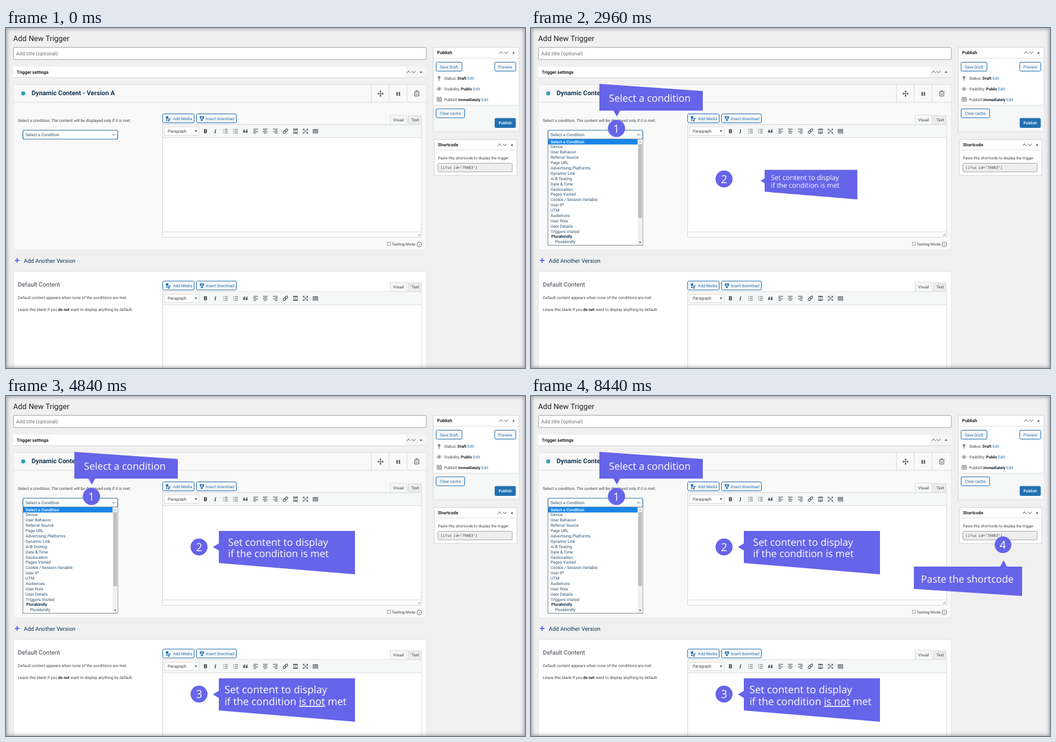
Write an HTML page that moves like this. It is 873 px wide and 572 px high and loops after 8760 ms.

```html
<!DOCTYPE html>
<html lang="en">
<head>
<meta charset="utf-8">
<title>Add New Trigger</title>
<style>
html, body { margin: 0; width: 100%; height: 100%; overflow: hidden; background: #f0f0f1; }
body::after { content: ""; position: fixed; inset: 0; box-shadow: inset 0 0 6px 1px rgba(60,60,65,.5); }
svg { display: block; width: 873px; height: 572px; }
text { font: 6.72px Roboto, sans-serif; fill: #3c434a; text-rendering: geometricPrecision; white-space: pre; }
.bold, .head { font-weight: 700; fill: #1d2327; }
.head { font-size: 7.5px; }
.link { fill: #2271b1; }
.mid { text-anchor: middle; }
.list { font-size: 6.95px; fill: #2c4f6e; }
.white { fill: #fff; }
.panel { fill: #fff; stroke: #d5d6d9; }
.btn { fill: #f6f7f7; stroke: #2271b1; }
.line { fill: none; stroke: #50575e; }
.rule { fill: none; stroke: #dcdcde; }
.ink { fill: #50575e; }
.navy { fill: #14364f; }

.tip { fill: #6664e8; }
.dot, .bubble { transform-box: fill-box; transform-origin: center; animation: 8760ms cubic-bezier(.215,.61,.355,1) infinite both; }
.bubble text { font: 16.75px "Open Sans", sans-serif; fill: #fff; }
.dot text { font: 18.5px "Open Sans", sans-serif; fill: #fff; text-anchor: middle; }

#menu { animation: menu 8760ms linear infinite both; }
@keyframes menu { 0%, 2.74% { opacity: 0 } 7.31%, 100% { opacity: 1 } }
#d1 { animation-name: d1 } #b1 { animation-name: b1 }
#d2 { animation-name: d2 } #b2 { animation-name: b2 }
#d3 { animation-name: d3 } #b3 { animation-name: b3 }
#d4 { animation-name: d4 } #b4 { animation-name: b4 }
@keyframes d1 { 0%, 12.33% { transform: scale(0) } 15.07%, 100% { transform: none } }
@keyframes b1 { 0%, 14.16% { transform: scale(0) } 18.72%, 100% { transform: none } }
@keyframes d2 { 0%, 30.59% { transform: scale(0) } 33.33%, 100% { transform: none } }
@keyframes b2 { 0%, 32.42% { transform: scale(0) } 36.99%, 100% { transform: none } }
@keyframes d3 { 0%, 47.03% { transform: scale(0) } 49.77%, 100% { transform: none } }
@keyframes b3 { 0%, 48.86% { transform: scale(0) } 53.42%, 100% { transform: none } }
@keyframes d4 { 0%, 63.93% { transform: scale(0) } 66.67%, 100% { transform: none } }
@keyframes b4 { 0%, 65.75% { transform: scale(0) } 70.32%, 100% { transform: none } }
</style>
</head>
<body>
<svg viewBox="0 0 873 572">
  <defs>
    <g id="arrows">
      <path class="line" d="M0 2.2 3.2-1.2 6.4 2.2M8.6-1.2 11.8 2.2 15-1.2"/>
      <path class="ink" d="M22.2 2 24.2-1.2 26.2 2Z"/>
    </g>
    <g id="rows"><path class="line" d="M0-3H7.5M0 0H7.5M0 3H7.5"/></g>

    <g id="editor">
      <rect class="btn" x="263.5" y="144.5" width="53" height="15" rx="2"/>
      <rect class="btn" x="320.5" y="144.5" width="67" height="15" rx="2"/>
      <g fill="#2271b1">
        <path d="M269 148.500h4v4h-4zM273.500 152h3.500v1.200h-2v3h-1.500z"/>
        <circle cx="270.500" cy="154.700" r="1.300"/><circle cx="273.800" cy="156" r="1.300"/>
        <path d="M326 148.500h7v4h-2v-2.500h-3v2.500h-2zM328.700 151h1.600v3h1.700l-2.500 3-2.500-3h1.700z"/>
      </g>
      <text class="link" x="281" y="154.500">Add Media</text>
      <text class="link" x="336" y="154.500">Insert download</text>

      <rect x="676.500" y="147.500" width="22" height="15" fill="#ebebec" stroke="#dcdcde"/>
      <rect x="646.500" y="146.500" width="27.500" height="16" fill="#f6f7f7" stroke="#dcdcde"/>
      <text x="651" y="157" font-size="6.9">Visual</text>
      <text x="682" y="157" font-size="6.900">Text</text>

      <rect x="263.500" y="162.500" width="435.500" height="189.500" fill="#fff" stroke="#d5d6d9"/>
      <rect x="264" y="163" width="434.500" height="21.500" fill="#f6f7f7"/>
      <path class="rule" d="M264 184.500H699M264 343H699"/>
      <path d="M693 350l4-4M695.500 350l1.500-1.500" class="line" stroke-width=".7"/>

      <rect x="266.500" y="166.500" width="58.500" height="14" fill="#fff" stroke="#dcdcde"/>
      <text x="272" y="176" style="font-size:6.9px">Paragraph</text>
      <path class="ink" d="M317.300 172.200h4.600l-2.300 3z"/>

      <text class="mid" x="335.500" y="177" style="font-size:9.500px;font-weight:900">B</text>
      <text class="mid" x="352" y="177" style="font:italic 700 9.500px 'Liberation Serif',serif">I</text>
      <path class="line" d="M368 170.500h5M368 173.500h5M368 176.500h5" stroke-width=".9"/>
      <path class="line" d="M365.500 170.500h1.400M365.500 173.500h1.400M365.500 176.500h1.400"/>
      <path class="line" d="M385 170.500h5M385 173.500h5M385 176.500h5" stroke-width=".9"/>
      <path class="line" d="M383 169.500v2M383 172.500v2M383 175.500v2" stroke-width=".8"/>
      <path d="M402 170.500q-3 1-3 4.200a1.600 1.600 0 1 0 1.600-1.700q.2-1 1.400-1.500zM406.300 170.500q-3 1-3 4.200a1.600 1.600 0 1 0 1.600-1.700q.2-1 1.400-1.500z" class="ink" stroke="#50575e" stroke-width=".4"/>
      <path class="line" d="M416 170h8M416 172.300h5M416 174.600h8M416 177h5"/>
      <path class="line" d="M432 170h8M433.500 172.300h5M432 174.600h8M433.500 177h5"/>
      <path class="line" d="M449 170h8M452 172.300h5M449 174.600h8M452 177h5"/>
      <g class="line" transform="rotate(-45 470 173.500)" stroke-width="1.200">
        <rect x="465.300" y="171.800" width="5" height="3.400" rx="1.700"/>
        <rect x="469.700" y="171.800" width="5" height="3.400" rx="1.700"/>
      </g>
      <path class="line" d="M483 170.500h8M483 176.500h8" stroke-width="2"/>
      <path class="line" d="M483 173.500h8" stroke-dasharray="2 1"/>
      <path class="line" d="M500.500 170.500l6.500 6M507 170.500l-6.500 6"/>
      <path class="ink" d="M499.500 169.500h3l-3 3zM508 169.500h-3l3 3zM499.500 177.500h3l-3-3zM508 177.500h-3l3-3z"/>
      <rect x="516" y="170" width="9" height="7.500" fill="#777c82"/>
      <path d="M517 172.300h7M517 174.300h7M517 176.200h7" stroke="#f6f7f7" stroke-width=".8" stroke-dasharray="1.300 .6"/>
    </g>
  </defs>

  <!-- main column -->
  <rect width="873" height="572" fill="#f0f0f1"/>
  <text x="12" y="21.500" style="font-size:12.800px;fill:#1d2327">Add New Trigger</text>
  <rect x="12.500" y="32.500" width="694.500" height="20.500" rx="2" fill="#fff" stroke="#a3a6aa"/>
  <text x="17" y="45.800" style="font-size:8.500px;fill:#6c7076">Add title (optional)</text>

  <rect x="12" y="65" width="695" height="18.500" fill="#f5f5f6"/>
  <rect x="12" y="65" width="660" height="18.500" fill="#fff"/>
  <path class="rule" d="M12 83.500H707"/>
  <text class="head" x="18" y="76.800">Trigger settings</text>
  <use href="#arrows" x="674" y="73.500"/>

  <rect x="12.500" y="95.500" width="694.500" height="278" fill="#f9f9f9" stroke="#e6e6e8"/>
  <path class="rule" d="M12 125H707M614.500 95V125M644.500 95V125M674.500 95V125" stroke="#e2e3e5"/>
  <circle cx="29" cy="110" r="3.500" fill="#2f9fb8"/>
  <text class="navy" x="43" y="113.200" style="font-size:10.800px;font-weight:600;fill:#14364f">Dynamic Content - Version A</text>
  <path class="line" d="M626 110.500h8M630 106.500v8"/>
  <path class="ink" d="M630 105l2 2.500h-4zM630 116l2-2.500h-4zM624.500 110.500l2.500-2v4zM635.500 110.500l-2.500-2v4z"/>
  <path class="ink" d="M656.800 107.500h2.200v6.500h-2.200zM660.600 107.500h2.200v6.500h-2.200z"/>
  <path class="line" d="M687.500 108v6.500h7V108M686.500 107.200h9M689.500 107v-1.500h3V107M689.800 109.500v3.500M692.200 109.500v3.500" stroke-width=".9"/>

  <text x="20" y="157.600">Select a condition. The content will be displayed only if it is met:</text>
  <rect x="28.500" y="172" width="159.500" height="15" rx="2" fill="#fff" stroke="#2e74a8" stroke-width="1.200"/>
  <text class="list" x="33" y="182" style="font-size:7.050px">Select a Condition</text>
  <path class="line" d="M178.500 178.300l2.500 2.500 2.500-2.500"/>
  <use href="#editor"/>
  <rect x="641.500" y="360.500" width="5" height="5" fill="#fff" stroke="#8c8f94" stroke-width=".8"/>
  <text x="649" y="366.200" style="font-size:6.550px">Testing Mode</text>
  <circle cx="695.300" cy="364" r="4" class="line" stroke-width=".8"/>
  <text class="mid" x="695.300" y="366" style="font-size:5.500px">i</text>

  <path d="M15 391h7.500M18.700 387.200v7.500" stroke="#6864e8" stroke-width="2"/>
  <text x="30" y="394.700" style="font-size:9.470px;fill:#14364f">Add Another Version</text>

  <rect x="12.500" y="409.500" width="694.500" height="180" fill="#fff" stroke="#e2e3e5"/>
  <text x="20" y="435" style="font-size:10.200px">Default Content</text>
  <text x="20" y="455.600">Default content appears when none of the conditions are met.</text>
  <text x="20" y="475.800">Leave this blank if you <tspan class="bold">do not</tspan> want to display anything by default.</text>
  <use href="#editor" y="281.300"/>
  <rect x="264" y="467" width="434.500" height="105" fill="#fff"/>

  <!-- publish box -->
  <rect class="panel" x="718.500" y="32.500" width="144.500" height="141.500"/>
  <rect x="719" y="130" width="143.500" height="43.500" fill="#f6f7f7"/>
  <path class="rule" d="M718 51H863M718 130H863"/>
  <text class="head" x="725" y="44.300" style="font-size:7.600px">Publish</text>
  <use href="#arrows" x="829.500" y="41"/>
  <rect class="btn" x="723.500" y="57.500" width="43.500" height="15" rx="2"/>
  <rect class="btn" x="822" y="57.500" width="35.500" height="15" rx="2"/>
  <text class="link mid" x="745.300" y="67.500">Save Draft</text>
  <text class="link mid" x="839.700" y="67.500">Preview</text>
  <circle cx="728.500" cy="83" r="2.300" fill="#82878c"/><path d="M728.500 84v5" stroke="#82878c" stroke-width="1.200"/>
  <text x="737" y="87.200">Status: <tspan class="bold">Draft</tspan> <tspan class="link">Edit</tspan></text>
  <path d="M724.500 102.500q4-5 8 0q-4 5-8 0z" fill="none" stroke="#82878c"/><circle cx="728.500" cy="102.300" r="1.600" fill="#82878c"/>
  <text x="737" y="104.800">Visibility: <tspan class="bold">Public</tspan> <tspan class="link">Edit</tspan></text>
  <path d="M725 118h7.500v5.500H725zM725 120.700h7.500M727.500 118v5.500M730 118v5.500M726.500 115.500v2M731 115.500v2M724.700 117.400h8" fill="none" stroke="#82878c" stroke-width=".9"/>
  <text x="737" y="122.600">Publish <tspan class="bold">immediately</tspan> <tspan class="link">Edit</tspan></text>
  <rect class="btn" x="723.500" y="136" width="48" height="15" rx="2"/>
  <text class="link mid" x="747.500" y="146">Clear cache</text>
  <rect x="822" y="151.500" width="35.500" height="16.500" rx="2" fill="#2271b1"/>
  <text class="mid white" x="839.700" y="162.300" style="font-weight:500">Publish</text>

  <!-- shortcode box -->
  <rect class="panel" x="720.500" y="187.500" width="139" height="60.500"/>
  <path class="rule" d="M720 205H860"/>
  <text class="head" x="726.500" y="198.500" style="font-size:7.350px">Shortcode</text>
  <use href="#arrows" x="827" y="196"/>
  <text x="726.500" y="220.600" style="font-size:6.430px">Paste this shortcode to display the trigger</text>
  <rect x="726.500" y="227.500" width="125" height="14.500" rx="2" fill="#eeeeef" stroke="#a3a6aa"/>
  <text x="731" y="236.600" style="font:6.060px 'DejaVu Sans Mono',monospace">[ifso id="79083"]</text>

  <!-- open condition list -->
  <g id="menu">
    <rect x="28.500" y="187" width="159.500" height="178.500" fill="#fff" stroke="#85898e"/>
    <rect x="29" y="187" width="150.500" height="9" fill="#1a86e8"/>
    <rect x="179.500" y="187.500" width="8" height="177.500" fill="#f1f1f1"/>
    <rect x="180.300" y="195.500" width="6.400" height="124.500" fill="#bfc0c1"/>
    <path d="M181.700 192.800l1.800-2.300 1.800 2.300z" fill="#a3a3a3"/>
    <path d="M181.500 359.500h4l-2 2.500z" fill="#505050"/>
    <text class="list" y="193.600">
      <tspan x="33" class="white" font-weight="500">Select a Condition</tspan>
      <tspan x="33" dy="8.880">Device</tspan>
      <tspan x="33" dy="8.880">User Behavior</tspan>
      <tspan x="33" dy="8.880">Referral Source</tspan>
      <tspan x="33" dy="8.880">Page URL</tspan>
      <tspan x="33" dy="8.880">Advertising Platforms</tspan>
      <tspan x="33" dy="8.880">Dynamic Link</tspan>
      <tspan x="33" dy="8.880">A/B Testing</tspan>
      <tspan x="33" dy="8.880">Date &amp; Time</tspan>
      <tspan x="33" dy="8.880">Geolocation</tspan>
      <tspan x="33" dy="8.880">Pages Visited</tspan>
      <tspan x="33" dy="8.880">Cookie / Session Variable</tspan>
      <tspan x="33" dy="8.880">User IP</tspan>
      <tspan x="33" dy="8.880">UTM</tspan>
      <tspan x="33" dy="8.880">Audiences</tspan>
      <tspan x="33" dy="8.880">User Role</tspan>
      <tspan x="33" dy="8.880">User Details</tspan>
      <tspan x="33" dy="8.880">Triggers Visited</tspan>
      <tspan x="34" dy="8.880" font-weight="700" class="navy">Plurabindly</tspan>
      <tspan x="40.500" dy="8.880">Plurabindly</tspan>
    </text>
  </g>

  <!-- callouts -->
  <g id="d1" class="dot"><circle class="tip" cx="143.800" cy="169" r="14.500"/><text x="143.500" y="175.500">1</text></g>
  <g id="b1" class="bubble">
    <path class="tip" d="M115 94 289 106V139H150L144.300 149 138.500 139H115Z"/>
    <text x="131" y="124">Select a condition</text>
  </g>

  <g id="d2" class="dot"><circle class="tip" cx="324.700" cy="254" r="14.300"/><text x="324.700" y="260.500">2</text></g>
  <g id="b2" class="bubble">
    <path class="tip" d="M358 227H587V300L358 281V260L348 254 358 248Z"/>
    <text x="373.500" y="252">Set content to display</text>
    <text x="373.500" y="271.300">if the condition is met</text>
  </g>

  <g id="d3" class="dot"><circle class="tip" cx="324.700" cy="501.500" r="14.300"/><text x="324.700" y="508">3</text></g>
  <g id="b3" class="bubble">
    <path class="tip" d="M358 475H587V548L358 529V508L348 502 358 496Z"/>
    <text x="367.500" y="499.700" style="font-size:17.200px">Set content to display</text>
    <text x="367.500" y="520.300" style="font-size:17.200px">if the condition <tspan text-decoration="underline">is not</tspan> met</text>
  </g>

  <g id="d4" class="dot"><circle class="tip" cx="794" cy="250.300" r="14"/><text x="793.500" y="257">4</text></g>
  <g id="b4" class="bubble">
    <path class="tip" d="M644 287H789L795 276.500 800.500 287H826V336.500L644 324.500Z"/>
    <text x="656" y="314">Paste the shortcode</text>
  </g>
</svg>
</body>
</html>
```
